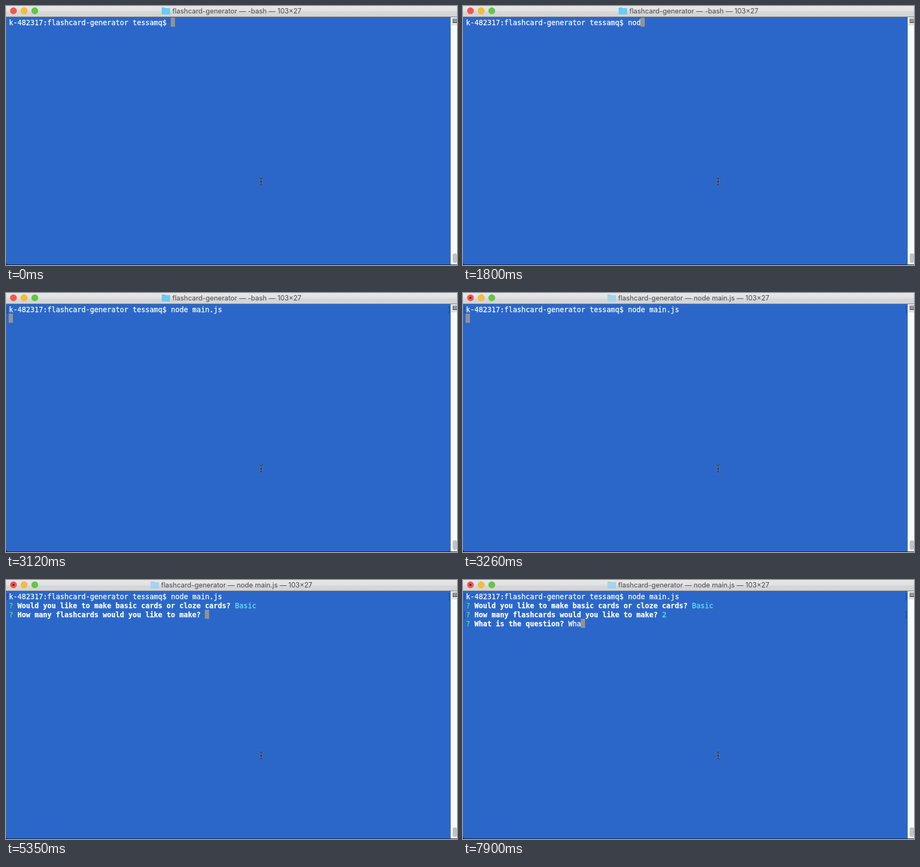
An HTML page with a canvas that plays this animation: 846x487 px, repeating every 8000 ms.

```html
<!DOCTYPE html>
<html lang="en">
<head>
<meta charset="utf-8">
<title>Flashcard terminal</title>
<style>
html, body { margin: 0; width: 100%; height: 100%; overflow: hidden; }
canvas { display: block; }
</style>
</head>
<body>
<canvas id="stage" width="846" height="487"></canvas>
<script>
const ctx = document.getElementById('stage').getContext('2d');
const LOOP = 8000, COL = 8, ROW = 17, LEFT = 5, TOP = 22;
const MONO = '13.29px "DejaVu Sans Mono", monospace';
const WHITE = '#fff', GREEN = '#5fe25f', CYAN = '#63e6f0', HINT = '#8fa9e2';
const PROMPT = 'k-482317:flashcard-generator tessamq$ ';

// Typed text by time, in ms.
const command = [
  [0, ''], [1050, 'n'], [1350, 'nd'], [1650, 'n'], [1800, 'nod'], [1950, 'node'],
  [2090, 'node '], [2390, 'node ma'], [2530, 'node main'], [2680, 'node main.'],
  [2830, 'node main.j'], [2970, 'node main.js']
];
const count = [[0, ''], [6400, '2']];
const answer = [[0, ''], [7750, 'W'], [7900, 'Wha']];
const typed = (steps, t) => steps.filter(([start]) => start <= t).pop()[1];

function rect(x, y, w, h, color) {
  ctx.fillStyle = color;
  ctx.fillRect(x, y, w, h);
}

function rounded(x, y, w, h, r, color) {
  ctx.fillStyle = color;
  ctx.beginPath();
  ctx.roundRect(x, y, w, h, r);
  ctx.fill();
}

function disc(x, y, r, color, edge) {
  ctx.beginPath();
  ctx.arc(x, y, r, 0, Math.PI * 2);
  ctx.fillStyle = color;
  ctx.fill();
  if (edge) {
    ctx.lineWidth = 0.6;
    ctx.strokeStyle = edge;
    ctx.stroke();
  }
}

function line(points, color, width = 1) {
  ctx.beginPath();
  points.forEach(([x, y]) => ctx.lineTo(x, y));
  ctx.strokeStyle = color;
  ctx.lineWidth = width;
  ctx.stroke();
}

// Writes a string at a grid cell and returns the column after it.
function write(row, col, text, color = WHITE, bold = false) {
  const x = LEFT + col * COL + 0.5, y = TOP + row * ROW + 14;
  ctx.font = (bold ? 'bold ' : '') + MONO;
  ctx.fillStyle = ctx.strokeStyle = color;
  ctx.lineWidth = 0.25;
  ctx.fillText(text, x, y);
  ctx.strokeText(text, x, y);
  return col + text.length;
}

function caret(row, col) {
  rect(LEFT + col * COL, TOP + row * ROW, COL, ROW, '#929292');
}

function ask(row, question) {
  write(row, 0, '?', GREEN);
  return write(row, 2, question, WHITE, true) + 1;
}

function brackets(row) {
  const y = TOP + row * ROW + 3.5;
  for (const [x, tick] of [[2.5, 2], [831.5, -2]]) {
    line([[x + tick, y], [x, y], [x, y + 12], [x + tick, y + 12]], '#1c4288');
  }
}

function titleBar(running) {
  const shade = ctx.createLinearGradient(0, 0, 0, 20);
  shade.addColorStop(0, '#e7e7e7');
  shade.addColorStop(0.5, '#e1e1e1');
  shade.addColorStop(0.5, '#d8d8d8');
  shade.addColorStop(1, '#d3d3d3');
  rect(0, 0, 846, 20, shade);
  rect(0, 20, 846, 1, '#74777c');

  disc(14, 9, 6, '#f4564e', '#d6453e');
  disc(34, 9, 6, '#f8bd32', '#dba02b');
  disc(54, 9, 6, '#5fca40', '#4aae31');
  if (running) disc(14, 9, 2, '#5e0f0b');

  const x = running ? 271 : 292;
  rounded(x, 3, 7, 4, 1, running ? '#93cbe2' : '#56b8e4');
  rounded(x, 4, 16, 12, 1, running ? '#a0d5ea' : '#6ecaf3');
  ctx.font = '12.85px Inter, sans-serif';
  ctx.fillStyle = '#474747';
  ctx.fillText(`flashcard-generator — ${running ? 'node main.js' : '-bash'} — 103×27`, x + 20, 14);
}

function scrollBar() {
  rect(834, 21, 12, 466, '#fafafa');
  rect(834, 21, 1, 466, '#e3e3e3');
  rect(835, 21, 11, 14, '#e9e9e9');
  rect(835, 35, 11, 1, '#c9c9c9');
  rect(838, 24, 8, 8, '#555');
  for (const y of [25, 27, 29]) rect(839, y, 7, 1, '#d5d5d5');
  rounded(838, 465, 8, 18, 4, '#c1c1c1');
}

function pointer() {
  const beam = (color, width) => {
    for (const side of [-1, 1]) {
      const x = 478.5 + side * 3;
      line([[x, 322.5], [478.5, 324.5], [478.5, 335.5], [x, 337.5]], color, width);
    }
    line([[476.5, 330.5], [480.5, 330.5]], color, width);
  };
  beam('#a9c1ea', 2);
  beam('#0a0f18', 1.2);
}

function terminal(t) {
  const end = write(0, write(0, 0, PROMPT), typed(command, t));
  if (t < 3120) return caret(0, end);
  brackets(0);
  if (t < 4010) return caret(1, 0);

  const kind = ask(1, 'Would you like to make basic cards or cloze cards?');
  if (t < 5350) {
    write(1, kind, '(Use arrow keys)', HINT);
    write(2, 0, '❯ Basic', CYAN);
    write(3, 2, 'Cloze');
    return;
  }
  write(1, kind, 'Basic', CYAN);

  const total = ask(2, 'How many flashcards would you like to make?');
  const done = t >= 6850;
  const next = write(2, total, typed(count, t), done ? CYAN : WHITE);
  if (!done) return caret(2, next);
  brackets(2);
  caret(3, write(3, ask(3, 'What is the question?'), typed(answer, t)));
}

function draw(now) {
  const t = now % LOOP;
  rect(0, 0, 846, 487, '#0d1a2e');
  rounded(0, 20, 846, 466, [0, 0, 0, 4], '#2b67c9');
  titleBar(t >= 3260);
  scrollBar();
  rect(0, 486, 846, 1, '#0d1a2e');
  terminal(t);
  pointer();
}

const start = performance.now();
function frame() {
  draw(performance.now() - start);
  requestAnimationFrame(frame);
}
frame();
</script>
</body>
</html>
```
